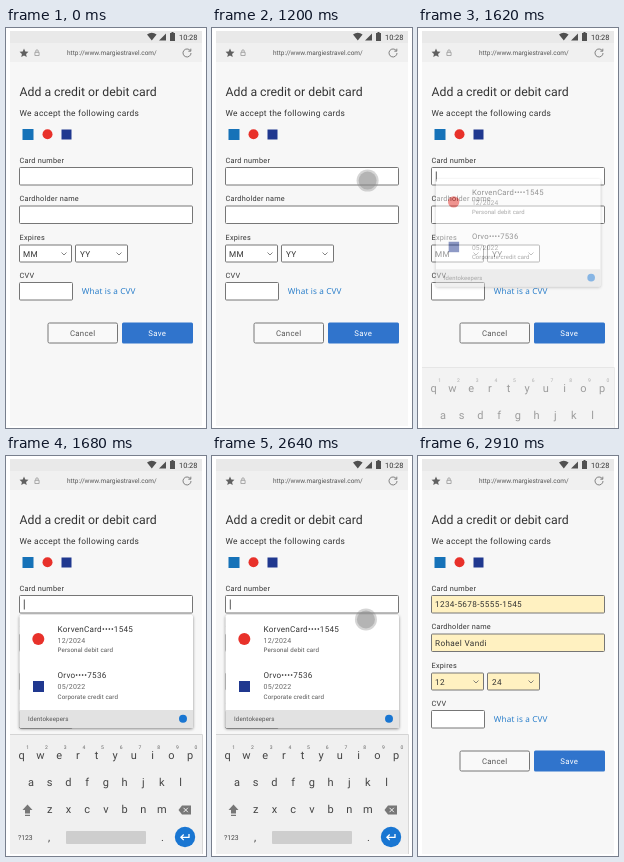
These frames come from a looping animation (200 by 400 pixels, 4050 ms). An HTML page:

```html
<!DOCTYPE html>
<html lang="en">
<head>
<meta charset="utf-8">
<title>Card autofill</title>
<style>
  html, body { margin: 0; width: 100%; height: 100%; overflow: hidden; background: #fff; }
  svg { display: block; width: 100%; height: 100%; font-family: Roboto, sans-serif; fill: #333; text-rendering: geometricPrecision; }
  .label { font-size: 7.3px; letter-spacing: .25px; }
  .value { font-size: 8.2px; letter-spacing: .35px; }
  .button { font-size: 7.8px; letter-spacing: .3px; text-anchor: middle; }
  .field { fill: #fff; stroke: #767676; stroke-width: 1; }
  .filled .autofill { fill: #fff1c1; }
  .line { fill: none; stroke: #666; stroke-width: .8; }
  .entry { font-size: 8.1px; letter-spacing: .25px; fill: #333; }
  .date { font-size: 7px; letter-spacing: .2px; fill: #666; }
  .note { font-size: 6.2px; letter-spacing: .12px; fill: #555; }
  #bar { filter: drop-shadow(0 .6px .5px rgba(0, 0, 0, .25)); }
  #panel { filter: drop-shadow(0 1px 1.5px rgba(0, 0, 0, .45)); }
  #board { filter: drop-shadow(0 0 .7px rgba(0, 0, 0, .5)); }
  #keys { font-size: 11px; text-anchor: middle; fill: #444; }
  #keys .digit { font-size: 5px; fill: #666; }
</style>
</head>
<body>
<svg id="stage" viewBox="0 0 200 400">
  <rect x="4" y="3" width="192" height="395" fill="#f7f7f7"/>

  <g id="browser">
    <rect id="bar" x="4" y="15" width="192" height="19" fill="#f0f0f0"/>
    <rect x="4" y="3" width="192" height="12" fill="#e9e9e9"/>
    <path d="M141 6.500q4.800-3.500 9.600 0L145.800 12.500zM153 12.500h7V5.500zM164 5h1.500V4h2v1h1.500v8h-5z" fill="#505050"/>
    <text x="173" y="11.600" font-size="7.400">10:28</text>
    <path transform="translate(18 24.800) scale(.86)" d="M0-5l1.500 3.400 3.700.4L2.400 1.300l.8 3.700L0 3.100-3.200 5l.8-3.700-2.800-2.500 3.700-.4z" fill="#606060"/>
    <path class="line" d="M28.900 24.300h4.200v3.200h-4.200zM29.800 24.300V23a1.200 1.200 0 0 1 2.400 0v1.300" style="stroke:#999"/>
    <text x="61" y="27.300" font-size="6.470" fill="#555">http://www.margiestravel.com/</text>
    <path class="line" d="M184.300 22.700a4 4 0 1 0 .7 2.300M184.800 20.700v2.500h-2.500"/>
  </g>

  <g id="form">
    <text x="13.500" y="67.700" font-size="12.280">Add a credit or debit card</text>
    <text x="13.500" y="87.500" font-size="8.400" letter-spacing=".26">We accept the following cards</text>
    <rect x="16.500" y="101" width="11" height="11" fill="#1672b8"/>
    <circle cx="41.500" cy="106.300" r="5" fill="#e8312a"/>
    <rect x="55.500" y="101.500" width="10" height="10" fill="#20388f"/>

    <text class="label" x="13.500" y="135">Card number</text>
    <rect class="field autofill" x="13.500" y="139.500" width="173" height="17.500" rx="1"/>
    <text class="label" x="13.500" y="173.400">Cardholder name</text>
    <rect class="field autofill" x="13.500" y="178" width="173" height="17.500" rx="1"/>
    <text class="label" x="13.500" y="212">Expires</text>
    <rect class="field autofill" x="13.500" y="217" width="52" height="17" rx="1"/>
    <rect class="field autofill" x="69.500" y="217" width="52" height="17" rx="1"/>
    <path class="line" d="M55.500 224.500l2.500 2.500 2.500-2.500M110.500 224.500l2.500 2.500 2.500-2.500"/>
    <text class="label" x="13.500" y="250">CVV</text>
    <rect class="field" x="13.500" y="254.500" width="53" height="17.500" rx="1"/>
    <text x="75.800" y="265.600" font-size="8.200" letter-spacing=".15" fill="#1f78c8" style="font-family:'Open Sans',sans-serif">What is a CVV</text>

    <text class="value" id="number" x="17" y="151.300"></text>
    <text class="value" id="holder" x="17" y="189.800"></text>
    <text class="value" id="month" x="17" y="228.500"></text>
    <text class="value" id="year" x="74" y="228.500"></text>
    <path id="caret" d="M18.300 143.500v10" stroke="#444" stroke-width=".9"/>

    <rect class="field" x="42" y="295" width="69.500" height="20" rx="1.500" style="fill:#f9f9f9"/>
    <text class="button" x="76.700" y="307.800" fill="#555">Cancel</text>
    <rect x="116" y="294.500" width="71" height="21" rx="1.500" fill="#3074cc"/>
    <text class="button" x="151.300" y="307.800" fill="#fff">Save</text>
  </g>

  <g id="menu">
    <rect id="panel" x="13.500" y="159" width="173.500" height="113" rx="1.500" fill="#fff"/>
    <path d="M13.500 254H187v16.500q0 1.500-1.500 1.500H15q-1.500 0-1.500-1.500z" fill="#e2e2e2"/>
    <circle cx="32.300" cy="183" r="6" fill="#e8312a"/>
    <text class="entry" x="51.500" y="175.900">KorvenCard••••1545</text>
    <text class="date" x="51.500" y="186.600">12/2024</text>
    <text class="note" x="51.500" y="196.200">Personal debit card</text>
    <rect x="27" y="225" width="11" height="11" fill="#20388f"/>
    <text class="entry" x="51.500" y="222.300">Orvo••••7536</text>
    <text class="date" x="51.500" y="233.300">05/2022</text>
    <text class="note" x="51.500" y="243">Corporate credit card</text>
    <text class="note" x="22" y="265.200">Identokeepers</text>
    <circle cx="177" cy="262.800" r="4" fill="#1976d2"/>
  </g>

  <g id="keyboard">
    <rect id="board" x="4" y="278.500" width="192.500" height="119.500" fill="#f0f0f0"/>
    <g id="keys"></g>
    <path d="M21.500 348.500l5 5.500H24v3.500h-5V354h-2.500zM19 358.700h5v1.300h-5z" fill="#777"/>
    <path d="M172.500 354l3.500-4.500h9v9h-9z" fill="#777"/>
    <path d="M177.500 351.800l4.400 4.400m0-4.400l-4.400 4.400" stroke="#f0f0f0" stroke-width="1"/>
    <text x="12" y="384.300" font-size="6.800" fill="#444">?123</text>
    <text x="42" y="384.500" font-size="11" fill="#444">,</text>
    <rect x="60" y="375" width="80" height="13" rx="1" fill="#cecece"/>
    <text x="155" y="384.500" font-size="11" fill="#444">.</text>
    <circle cx="179" cy="381" r="10.200" fill="#1976d2"/>
    <path d="M183 378v3.300h-8m2.700-2.800l-2.800 2.800 2.800 2.800" fill="none" stroke="#fff" stroke-width="1.300"/>
  </g>

  <g id="touch" fill="#888">
    <circle r="11" opacity=".35"/>
    <circle r="9" opacity=".42"/>
  </g>
</svg>

<script>
const LOOP = 4050, TICK = 30;
const FOCUS = 1440, OPEN = 1560, SECOND_TOUCH = 2400, CLOSE = 2790, FILL = 2910;
const FADE = 120, KEYBOARD_HEIGHT = 122;
const $ = id => document.getElementById(id);
const EMPTY = { number: '', holder: '', month: 'MM', year: 'YY' };
const DETAILS = { number: '1234-5678-5555-1545', holder: 'Rohael Vandi', month: '12', year: '24' };

function addKey(text, x, y, className = '') {
  const key = document.createElementNS('http://www.w3.org/2000/svg', 'text');
  key.textContent = text;
  key.setAttribute('x', x);
  key.setAttribute('y', y);
  key.setAttribute('class', className);
  $('keys').append(key);
}

[['qwertyuiop', 15.7, 302.5], ['asdfghjkl', 25, 329.8], ['zxcvbnm', 43.7, 357.3]].forEach(([letters, x, y], row) => {
  [...letters].forEach((letter, i) => {
    addKey(letter, x + i * 18.7, y);
    if (row === 0) addKey((i + 1) % 10, x + 6 + i * 18.7, 292.8, 'digit');
  });
});

function smooth(time, start) {
  const p = Math.min(1, Math.max(0, (time - start) / FADE));
  return p * p * (3 - 2 * p);
}

// Finger position, or null while it is off the screen.
function touchAt(t) {
  if (t >= 900 && t < OPEN) {
    const u = (t - 900) / (OPEN - 900);
    return [158.5 - 14 * u * u, 163.5 - 20.5 * (1 - (1 - u) ** 1.25)];
  }
  if (t >= SECOND_TOUCH && t < 2850) {
    const u = (t - SECOND_TOUCH) / 420;
    return [144.5 + 16.5 * u, 149.5 + 24.5 * u];
  }
  return null;
}

function show(element, opacity, transform) {
  element.setAttribute('opacity', opacity);
  if (transform) element.setAttribute('transform', transform);
}

function draw(now) {
  const t = Math.floor(now % LOOP / TICK) * TICK;
  const filled = t >= FILL, focused = t >= FOCUS && !filled;
  const opened = smooth(t, OPEN);
  const raised = opened - smooth(t, CLOSE);

  $('stage').classList.toggle('filled', filled);
  for (const [id, text] of Object.entries(filled ? DETAILS : EMPTY)) $(id).textContent = text;
  show($('caret'), focused ? 1 : 0);

  const scale = .9 + .1 * opened;
  show($('menu'), filled ? 0 : opened, `translate(${100 - 100 * scale} 0) scale(${scale})`);
  show($('keyboard'), raised, `translate(0 ${KEYBOARD_HEIGHT * (1 - raised)})`);

  const touch = touchAt(t);
  show($('touch'), touch ? 1 : 0, touch && `translate(${touch})`);
}

const start = performance.now();
function frame() {
  draw(performance.now() - start);
  requestAnimationFrame(frame);
}
frame();
</script>
</body>
</html>
```
